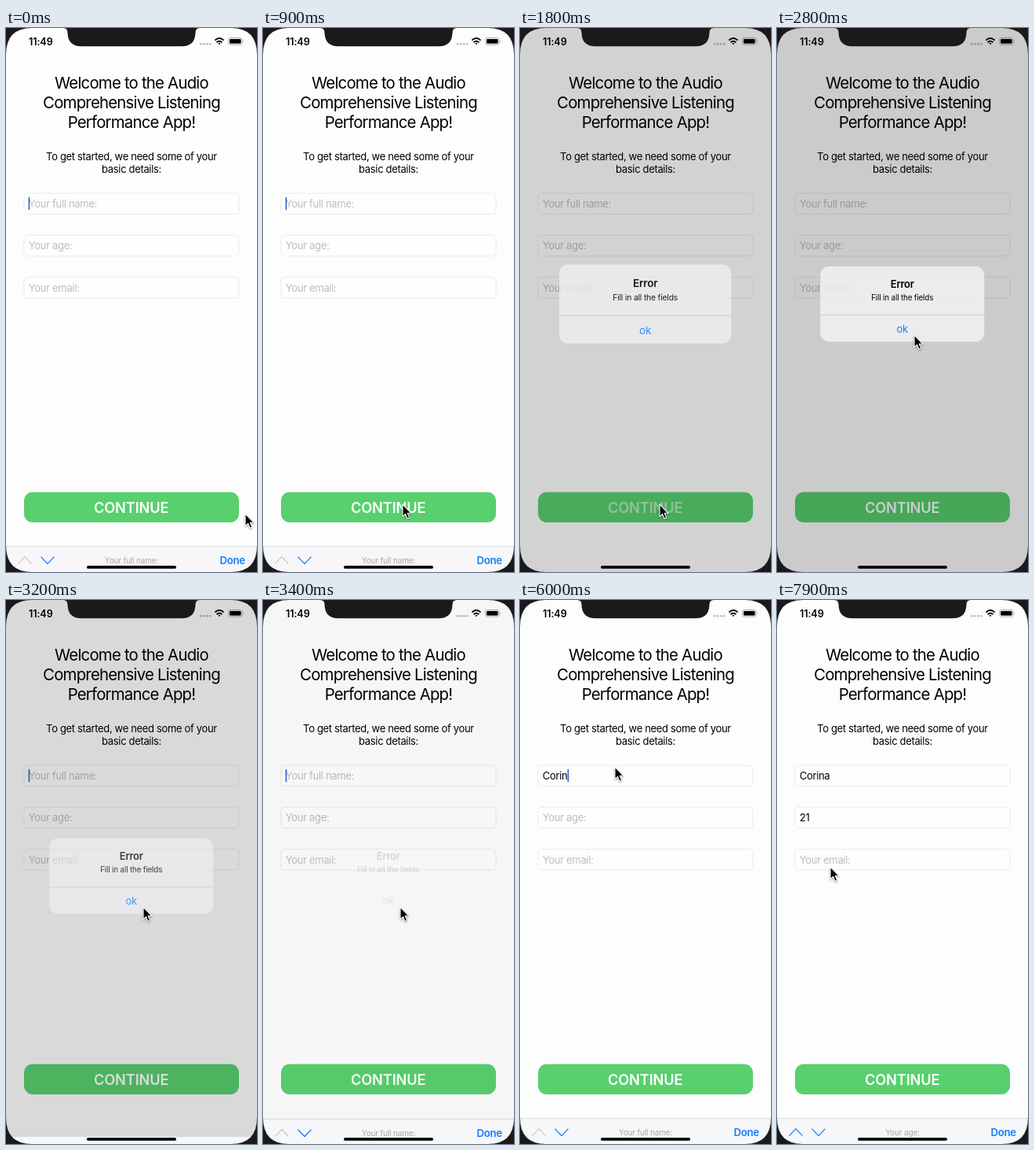
Write an HTML page that moves like this. It is 320 px wide and 691 px high and loops after 8000 ms.

```html
<!DOCTYPE html>
<html lang="en">
<head>
<meta charset="utf-8">
<title>Sign-up form</title>
<style>
  html, body { margin: 0; width: 100%; height: 100%; overflow: hidden; background: #1c191c; }
  svg { display: block; width: 100vw; height: 100vh; }
  text { font-family: Inter, Roboto, sans-serif; white-space: pre; }
  .mid { text-anchor: middle; }
  .title { font-size: 20.4px; letter-spacing: -.8px; }
  .sub { font-size: 13px; letter-spacing: -.34px; }
  .input { font-size: 13px; letter-spacing: -.32px; }
  .field { fill: #fefefe; stroke: #e9e8ee; }
  .blue { fill: #157efb; }
  .line { fill: none; stroke-width: 1.3; }
</style>
</head>
<body>
<svg viewBox="0 0 320 691">
  <rect width="320" height="691" fill="#fefdfe"/>

  <text x="29" y="22" font-size="12.6" font-weight="600" letter-spacing="-.1">11:49</text>
  <g fill="#b9b8ba">
    <circle cx="248.3" cy="20.3" r="1.4"/><circle cx="252.3" cy="20.3" r="1.4"/>
    <circle cx="256.3" cy="20.3" r="1.4"/><circle cx="260.3" cy="20.3" r="1.4"/>
  </g>
  <g fill="none" stroke="#000" stroke-width="1.9">
    <path d="M266.4 15.6Q272 10.6 277.6 15.6M268.6 18.2Q272 15.2 275.4 18.2"/>
    <path d="M270.4 19.6Q272 18.4 273.6 19.6L272 21.3Z" fill="#000" stroke="none"/>
  </g>
  <rect x="283.5" y="12.5" width="17.6" height="8.8" rx="2.5" fill="none" stroke="#a5a4a6" stroke-width=".9"/>
  <rect x="285" y="14" width="14.6" height="5.8" rx="1.4"/>
  <path d="M302.2 15.3q1.4 1.6 0 3.2z" fill="#a5a4a6"/>

  <g class="mid title">
    <text x="160" y="77.3">Welcome to the Audio</text>
    <text x="160" y="102.2">Comprehensive Listening</text>
    <text x="160" y="127.1">Performance App!</text>
  </g>
  <g class="mid sub">
    <text x="160" y="168">To get started, we need some of your</text>
    <text x="160" y="183.7">basic details:</text>
  </g>

  <g id="fields"></g>
  <rect id="caret" width="1.7" height="16.5" rx=".8" fill="#3767d6"/>

  <rect x="23" y="589.5" width="274" height="38.5" rx="11" fill="#58d06e"/>
  <text id="label" class="mid" x="159.7" y="615.5" font-size="18.2" font-weight="600" letter-spacing="-.1" fill="#fff">CONTINUE</text>

  <rect id="dim" width="320" height="691"/>

  <g id="alert">
    <rect x="-104.5" y="-47.8" width="209" height="95.6" rx="10.5" fill="#f3f2f3" opacity=".86"/>
    <path d="M-104.5 14H104.5" stroke="#c9c8ca" stroke-width=".8"/>
    <g class="mid">
      <text y="-20.2" font-size="13" font-weight="600" letter-spacing="-.25">Error</text>
      <text y="-4.8" font-size="9.8" letter-spacing="-.15">Fill in all the fields</text>
      <text class="blue" y="36.2" font-size="13" letter-spacing="-.2">ok</text>
    </g>
  </g>

  <g id="bar">
    <rect y="658" width="320" height="40" fill="#f7f6f8"/>
    <path d="M0 658.4H320" stroke="#d2d1d4" stroke-width=".8"/>
    <path id="up" class="line" d="M15.5 680.6L24 671.6 32.5 680.6"/>
    <path class="line" d="M44.5 671.6L53 680.6 61.5 671.6" stroke="#157efb"/>
    <text id="hint" class="mid" x="160" y="680" font-size="10.1" letter-spacing="-.2" fill="#a9a8ab"></text>
    <text class="blue" x="304.7" y="680.9" font-size="13.2" font-weight="600" letter-spacing="-.3" text-anchor="end">Done</text>
  </g>

  <g fill="#1c191c">
    <path d="M0 0H33Q0 0 0 34ZM320 0H287Q320 0 320 34ZM0 691H33Q0 691 0 657ZM320 691H287Q320 691 320 657Z"/>
    <path d="M73 0Q78.5 0 78.5 6Q79 23.3 96 23.3H224Q241 23.3 241.500 6Q241.500 0 247 0Z"/>
  </g>
  <rect x="103" y="683" width="114" height="3.8" rx="1.9"/>

  <path id="cursor" d="M0 0V15.600L3.500 12.300 6 18.200 8.700 17.100 6.200 11.300H11Z" stroke="#fff" stroke-width="1.100" stroke-linejoin="round" style="filter:drop-shadow(0 1px 1px #0006)"/>
</svg>
<script>
const LOOP = 8000;
const $ = id => document.getElementById(id);
const clamp = x => Math.min(1, Math.max(0, x));
const span = (t, from, len) => clamp((t - from) / len);
const easeOut = u => 1 - (1 - u) ** 2;
const smooth = u => u * u * (3 - 2 * u);

const fields = [
  { hint: 'Your full name:', value: 'Corina', keys: [5100, 5250, 5420, 5600, 5900, 6200], y: 210 },
  { hint: 'Your age:', value: '21', keys: [7150, 7300], y: 263.3 },
  { hint: 'Your email:', value: '', keys: [], y: 316.6 }
];
const FOCUS_AGE = 6950;

// Cursor moves: start, duration, destination
const moves = [
  [50, 250, 178, 605],
  [2000, 550, 175, 390],
  [3550, 600, 121, 212],
  [6300, 400, 92, 272],
  [7380, 320, 68, 339]
];

for (const f of fields) {
  $('fields').insertAdjacentHTML('beforeend',
    `<rect class="field" x="23" y="${f.y}" width="274" height="26.400" rx="4.500"/>
     <text class="input" x="28.800" y="${f.y + 18}"></text>`);
  f.text = $('fields').lastElementChild;
}

function cursorAt(t) {
  let x = 305, y = 617;
  for (const [start, len, toX, toY] of moves) {
    const u = smooth(span(t, start, len));
    x += (toX - x) * u;
    y += (toY - y) * u;
  }
  return [x, y];
}

// The caret stays solid after each key, then fades out and in once a second
function blink(t, since) {
  const p = ((t - since + 100) % 1000 + 1000) % 1000;
  return Math.min(span(p, 0, 100), 1 - span(p, 500, 200));
}

function drawFields(t) {
  for (const f of fields) {
    const n = f.keys.filter(k => k <= t).length;
    f.text.textContent = n ? f.value.slice(0, n) : f.hint;
    f.text.setAttribute('fill', n ? '#000' : '#bdbcc0');
    f.typed = n;
  }
  const onAge = t >= FOCUS_AGE;
  const f = fields[onAge ? 1 : 0];
  const base = onAge ? FOCUS_AGE : t < 3150 ? -300 : 3150;
  const since = f.typed ? f.keys[f.typed - 1] : base;
  const hidden = t >= 1600 && t < 3150;
  $('caret').setAttribute('x', f.typed ? 29 + f.text.getComputedTextLength() : 28.6);
  $('caret').setAttribute('y', f.y + 4.8);
  $('caret').setAttribute('opacity', hidden ? 0 : blink(t, since));
  $('hint').textContent = f.hint;
  $('up').setAttribute('stroke', onAge ? '#157efb' : '#c9c8cb');
}

function drawAlert(t) {
  const open = easeOut(span(t, 1600, 400));
  const stay = 1 - span(t, 3100, 350);
  $('dim').setAttribute('opacity', .2 * clamp(open * 1.15) * stay);
  $('alert').setAttribute('opacity', clamp(open * 1.15) * stay);
  $('alert').setAttribute('transform', `translate(159.7 350.6) scale(${1.2 - .2 * open})`);
}

function draw(t) {
  drawFields(t);
  drawAlert(t);
  const down = easeOut(span(t, 1550, 240)) - easeOut(span(t, 3150, 300));
  $('bar').setAttribute('transform', `translate(0 ${33.5 * down})`);
  const pressed = t >= 1450 ? 1 - span(t, 1700, 300) : 0;
  $('label').setAttribute('opacity', 1 - .7 * pressed);
  $('cursor').setAttribute('transform', `translate(${cursorAt(t)})`);
}

function frame(now) {
  draw(now % LOOP);
  requestAnimationFrame(frame);
}
requestAnimationFrame(frame);
</script>
</body>
</html>
```
